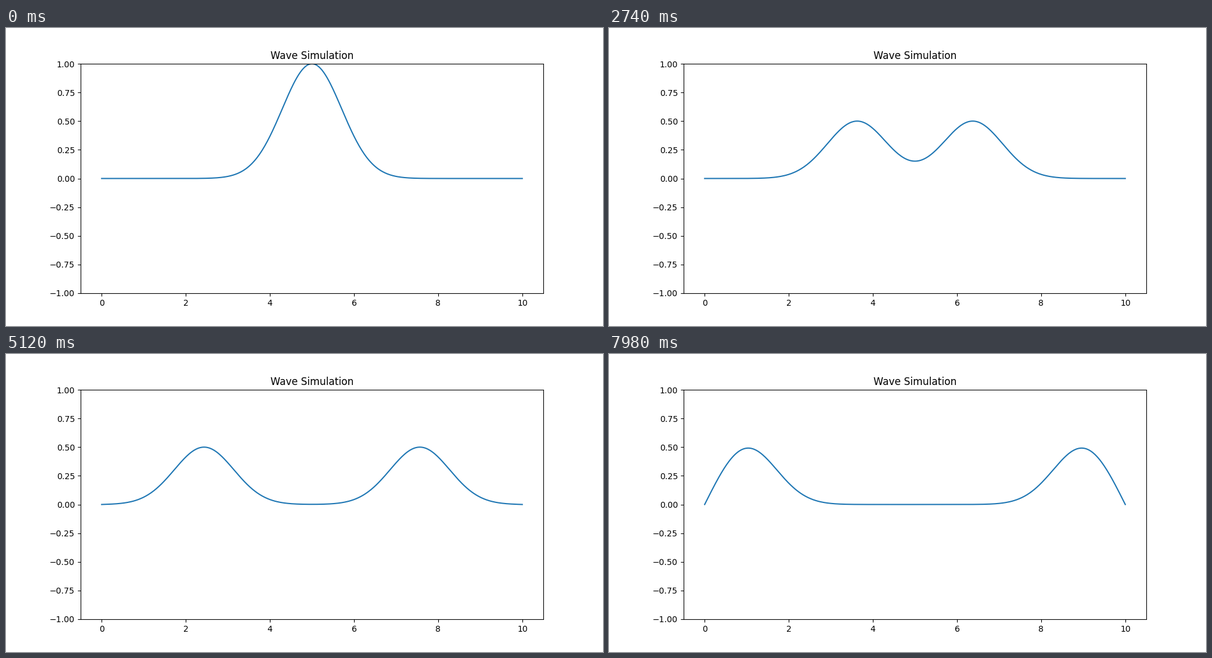
A matplotlib script that plays this animation: 1000 px wide and 500 px high, repeating every 8 s.

```python
import matplotlib.pyplot as plt
import numpy as np
from matplotlib.animation import FuncAnimation

LENGTH = 10
CENTER = 5
STEP = 0.01      # distance travelled per frame
FRAMES = 400

x = np.linspace(0, LENGTH, 501)


def pulse(pos):
    return np.exp(-(pos - CENTER) ** 2)


def wave(shift):
    """String with fixed ends: two half pulses plus their inverted reflections."""
    direct = pulse(x - shift) + pulse(x + shift)
    left = pulse(shift - x)
    right = pulse(2 * LENGTH - x - shift)
    u = 0.5 * (direct - left - right)
    u[0] = u[-1] = 0
    return u


fig, ax = plt.subplots(figsize=(10, 5), dpi=100)
line, = ax.plot(x, wave(STEP / 2), color="#1f77b4", lw=1.5)
ax.set_xlim(-0.5, 10.5)
ax.set_ylim(-1, 1)
ax.set_title("Wave Simulation")


def update(frame):
    line.set_ydata(wave(STEP * (frame + 0.5)))
    return line,


anim = FuncAnimation(fig, update, frames=FRAMES, interval=20,
                     repeat=True, repeat_delay=0)
plt.show()
```
